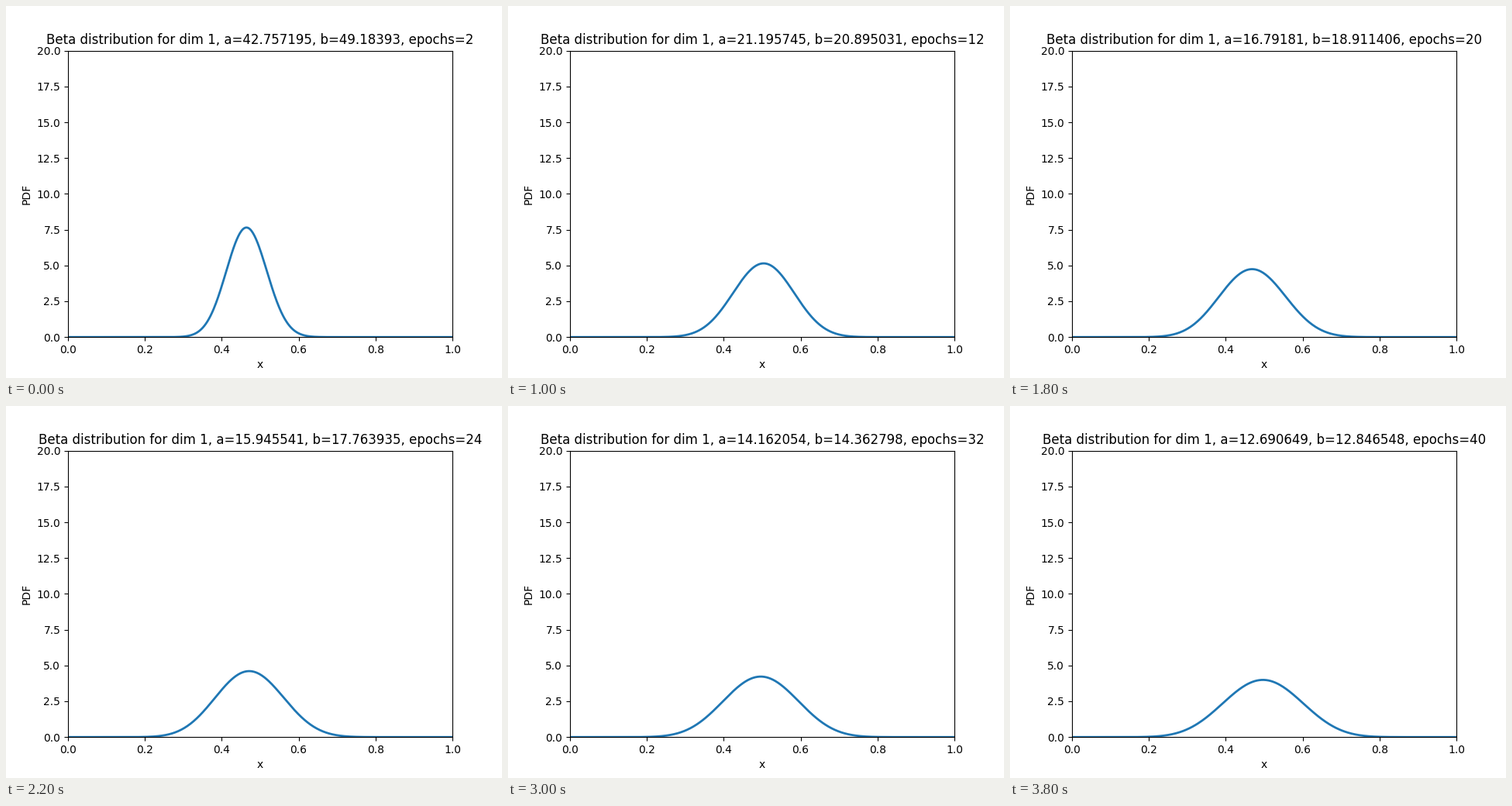
Recreate the animation shown at these times as a matplotlib script. Size 640 by 480 pixels, loop 4000 ms.

```python
from math import lgamma

import matplotlib.pyplot as plt
import numpy as np
from matplotlib.animation import FuncAnimation

FRAMES = 20
STEP = 2  # epochs per frame

# Key points of the training run; between them a and b follow power laws
KEY_EPOCHS = [2, 6, 12, 16, 24, 32, 40]
KEY_A = [42.757195, 26.00037, 21.195745, 17.888922, 15.945541, 14.162054, 12.690649]
KEY_B = [49.18393, 31.228706, 20.895031, 20.41715, 17.763935, 14.362798, 12.846548]

x = np.linspace(0, 1, 500)


def param_at(epoch, keys):
    return np.exp(np.interp(np.log(epoch), np.log(KEY_EPOCHS), np.log(keys)))


def beta_pdf(a, b):
    norm = np.exp(lgamma(a + b) - lgamma(a) - lgamma(b))
    return norm * x ** (a - 1) * (1 - x) ** (b - 1)


fig, ax = plt.subplots(figsize=(6.4, 4.8), dpi=100)
line, = ax.plot([], [], color="#1f77b4", lw=2)
ax.set(xlim=(0, 1), ylim=(0, 20), xlabel="x", ylabel="PDF")
title = ax.set_title("")


def update(i):
    epoch = STEP * (i + 1)
    a, b = param_at(epoch, KEY_A), param_at(epoch, KEY_B)
    line.set_data(x, beta_pdf(a, b))
    title.set_text(f"Beta distribution for dim 1, a={a:.8g}, b={b:.8g}, epochs={epoch}")
    return line, title


anim = FuncAnimation(fig, update, frames=FRAMES, interval=200,
                     repeat=True, repeat_delay=0, blit=False)
plt.show()
```
